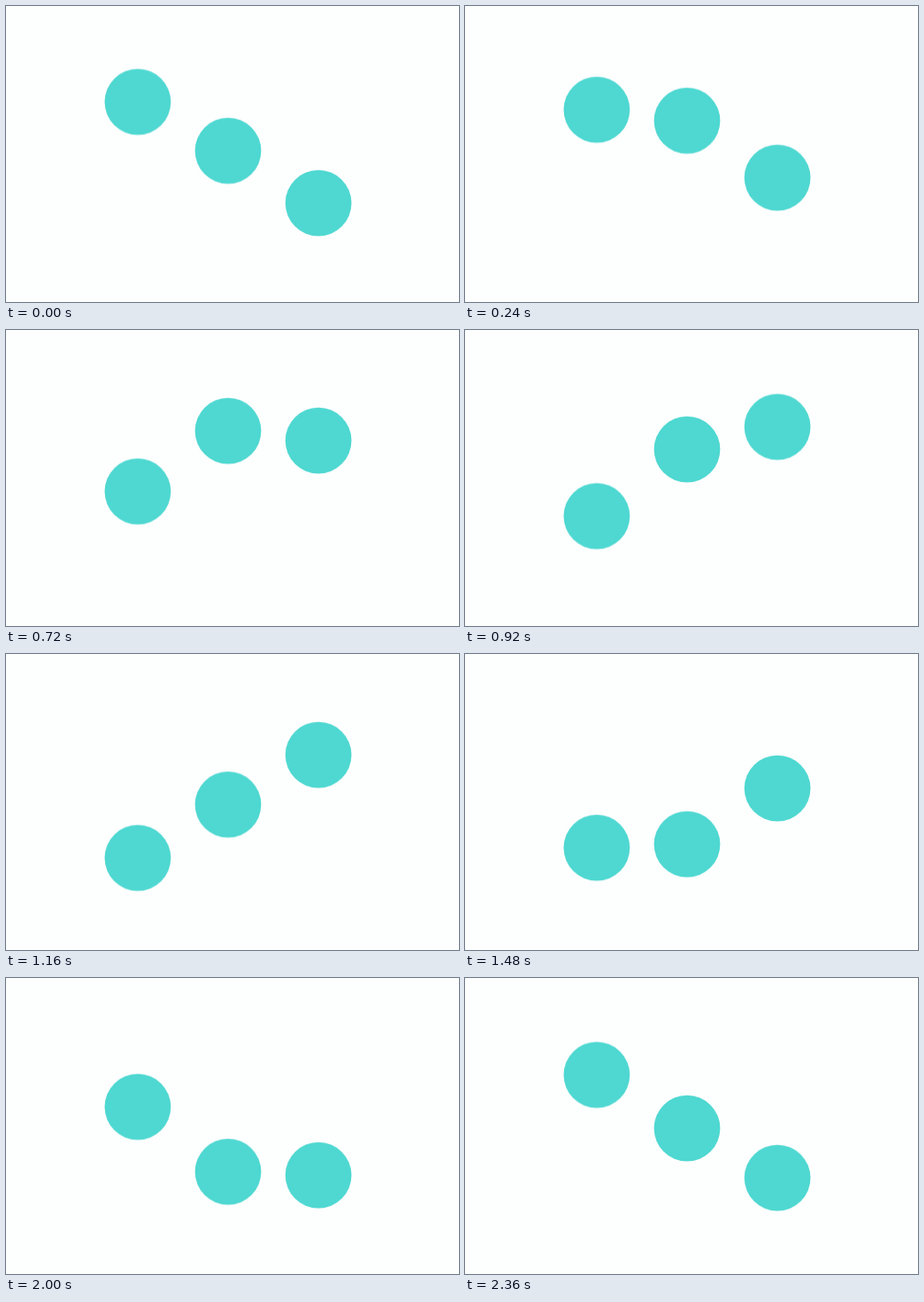
An HTML page that plays this animation: 512 by 335 pixels, repeating every 2.4 s.

```html
<!DOCTYPE html>
<html lang="en">
<head>
<meta charset="utf-8">
<title>Three bouncing dots</title>
<style>
  html, body {
    margin: 0;
    width: 100%;
    height: 100%;
    overflow: hidden;
    background: #fdfefe;
  }
  svg {
    display: block;
    width: 512px;
    height: 335px;
  }
  circle {
    fill: #4ed8d1;
    animation: bob 1200ms cubic-bezier(.333, 0, .667, 1) infinite alternate;
    animation-delay: calc(var(--peak) - 2400ms);
  }
  /* --peak: when the dot reaches its highest point */
  .left   { --peak: 40ms; }
  .middle { --peak: 560ms; }
  .right  { --peak: 1000ms; }

  @keyframes bob {
    from { transform: translateY(0); }
    to   { transform: translateY(124.2px); }
  }
</style>
</head>
<body>
<svg viewBox="0 0 512 335">
  <circle class="left" cx="148.9" cy="108.1" r="37.4"/>
  <circle class="middle" cx="251" cy="108.1" r="37.4"/>
  <circle class="right" cx="353.1" cy="108.1" r="37.4"/>
</svg>
</body>
</html>
```
